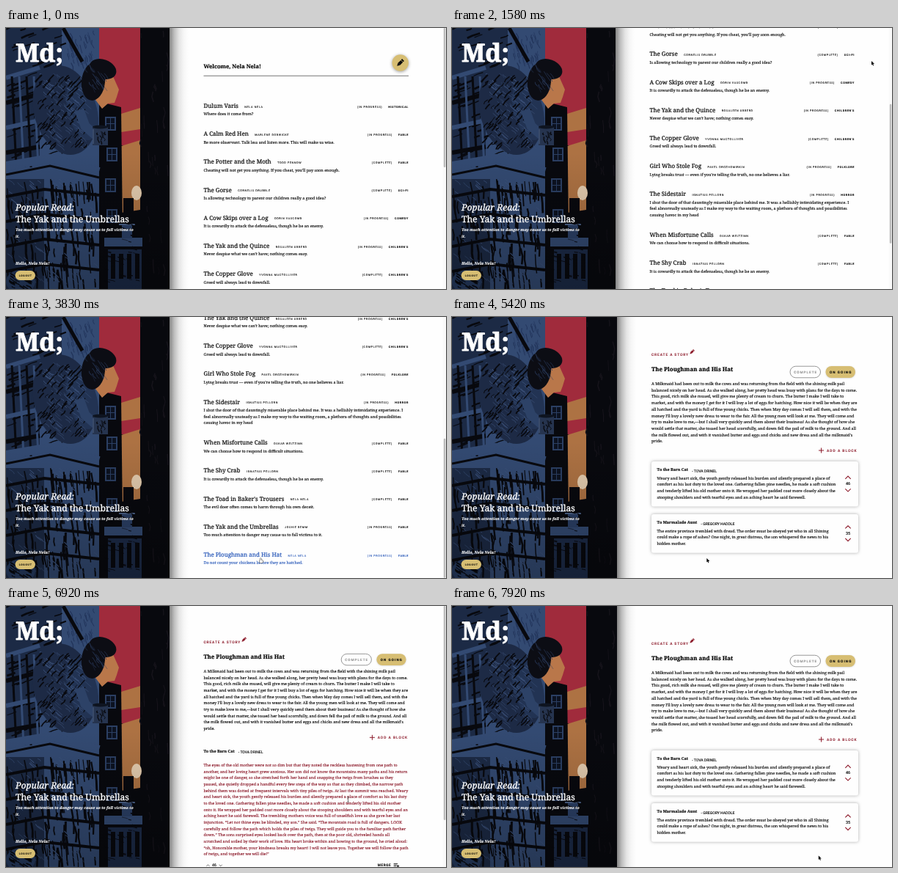
An HTML page with a canvas that plays this animation: 600 by 356 pixels, repeating every 8000 ms.

```html
<!DOCTYPE html>
<html lang="en">
<head>
<meta charset="utf-8">
<title>Story reader</title>
<style>
html, body { margin: 0; width: 100%; height: 100%; overflow: hidden; background: #fefefe; }
canvas { display: block; width: 600px; height: 356px; }
</style>
</head>
<body>
<canvas id="stage"></canvas>
<script>
const W = 600, H = 356, LOOP = 8000;
const SERIF = '"Noto Serif", serif', SANS = 'Roboto, sans-serif';
const INK = '#0c0c0c', RED = '#8c1a2a', GOLD = '#d7be73', BLUE = '#2858b8';
const LEFT = 269.5, RIGHT = 549, PITCH = 38.2, LEADING = 8.72, BODY = 5.43;
const MAX_SCROLL = 296;
const OPEN_STORY = 4300, EXPAND = 6130, COLLAPSE = 7640;

const canvas = document.getElementById('stage');
const dpr = window.devicePixelRatio || 1;
canvas.width = W * dpr;
canvas.height = H * dpr;
const c = canvas.getContext('2d');

const USER = 'Nela Nela';
const POPULAR = 'The Yak and the Umbrellas';
const STORY = 'The Ploughman and His Hat';
const DONE = '(COMPLETE)', OPEN = '(IN PROGRESS)';

// title, author, status, genre, description lines
const rows = [
  ['Dulum Varis', USER, OPEN, 'Historical', 'Where does it come from?'],
  ['A Calm Red Hen', 'Marlene Dobwicke', OPEN, 'Fable', 'Be more observant. Talk less and listen more. This will make us wise.'],
  ['The Potter and the Moth', 'Todd Fennow', DONE, 'Fable', "Cheating will not get you anything. If you cheat, you'll pay soon enough."],
  ['The Gorse', 'Cornelis Drubble', DONE, 'Sci-Fi', 'Is allowing technology to parent our children really a good idea?'],
  ['A Cow Skips over a Log', 'Odrin Vascomb', OPEN, 'Comedy', 'It is cowardly to attack the defenseless, though he be an enemy.'],
  ['The Yak and the Quince', 'Rosaleen Ubberd', OPEN, "Children's", "Never despise what we can't have; nothing comes easy."],
  ['The Copper Glove', 'Yvonna MacTolliver', DONE, "Children's", 'Greed will always lead to downfall.'],
  ['Girl Who Stole Fog', 'Pavel Drozhomirkin', OPEN, 'Folklore', "Lying breaks trust — even if you're telling the truth, no one believes a liar."],
  ['The Sidestair', 'Ignatius Pellorn', OPEN, 'Horror', 'I shut the door of that dauntingly miserable place behind me. It was a hellishly intimidating experience. I',
    'feel abnormally unsteady as I make my way to the waiting room, a plethora of thoughts and possibilities', 'causing havoc in my head'],
  ['When Misfortune Calls', 'Oskar Weltzinn', DONE, 'Fable', 'We can choose how to respond in difficult situations.'],
  ['The Shy Crab', 'Ignatius Pellorn', DONE, 'Fable', 'It is cowardly to attack the defenseless, though he be an enemy.'],
  ["The Toad in Baker's Trousers", USER, DONE, 'Fable', 'The evil doer often comes to harm through his own deceit.'],
  [POPULAR, 'Joshie Bemm', OPEN, 'Fable', 'Too much attention to danger may cause us to fall victims to it.'],
  [STORY, USER, OPEN, 'Fable', 'Do not count your chickens before they are hatched.']
];

const storyText = `A Milkmaid had been out to milk the cows and was returning from the field with the shining milk pail
balanced nicely on her head. As she walked along, her pretty head was busy with plans for the days to come.
This good, rich milk she mused, will give me plenty of cream to churn. The butter I make I will take to
market, and with the money I get for it I will buy a lot of eggs for hatching. How nice it will be when they are
all hatched and the yard is full of fine young chicks. Then when May day comes I will sell them, and with the
money I'll buy a lovely new dress to wear to the fair. All the young men will look at me. They will come and
try to make love to me,—but I shall very quickly send them about their business! As she thought of how she
would settle that matter, she tossed her head scornfully, and down fell the pail of milk to the ground. And all
the milk flowed out, and with it vanished butter and eggs and chicks and new dress and all the milkmaid's
pride.`.split('\n');

const blockOne = `Weary and heart sick, the youth gently released his burden and silently prepared a place of
comfort as his last duty to the loved one. Gathering fallen pine needles, he made a soft cushion
and tenderly lifted his old mother onto it. He wrapped her padded coat more closely about the
stooping shoulders and with tearful eyes and an aching heart he said farewell.`.split('\n');

const blockTwo = `The entire province trembled with dread. The order must be obeyed yet who in all Shining
could make a rope of ashes? One night, in great distress, the son whispered the news to his
hidden mother.`.split('\n');

const fullText = `The eyes of the old mother were not so dim but that they noted the reckless hastening from one path to
another, and her loving heart grew anxious. Her son did not know the mountains many paths and his return
might be one of danger, so she stretched forth her hand and snapping the twigs from brushes as they
passed, she quietly dropped a handful every few steps of the way so that as they climbed, the narrow path
behind them was dotted at frequent intervals with tiny piles of twigs. At last the summit was reached. Weary
and heart sick, the youth gently released his burden and silently prepared a place of comfort as his last duty
to the loved one. Gathering fallen pine needles, he made a soft cushion and tenderly lifted his old mother
onto it. He wrapped her padded coat more closely about the stooping shoulders and with tearful eyes and an
aching heart he said farewell. The trembling mothers voice was full of unselfish love as she gave her last
injunction. “Let not thine eyes be blinded, my son.” She said. “The mountain road is full of dangers. LOOK
carefully and follow the path which holds the piles of twigs. They will guide you to the familiar path farther
down.” The sons surprised eyes looked back over the path, then at the poor old, shriveled hands all
scratched and soiled by their work of love. His heart broke within and bowing to the ground, he cried aloud:
“oh, Honorable mother, your kindness breaks my heart! I will not leave you. Together we will follow the path
of twigs, and together we will die!”`.split('\n');

// Set large and scaled down, so that small sizes keep exact advances;
// the thin outline gives small type its weight.
function text(str, x, y, size, color = INK, { style = '', font = SERIF, gap = 0, align = 0 } = {}) {
  const k = size / 64;
  c.save();
  c.font = `${style} 64px ${font}`;
  c.letterSpacing = gap / k + 'px';
  c.textRendering = 'geometricPrecision';
  const width = c.measureText(str).width * k;
  c.translate(x - width * align, y);
  c.scale(k, k);
  c.fillStyle = c.strokeStyle = color;
  c.lineWidth = 1.7;
  c.lineJoin = 'round';
  c.fillText(str, 0, 0);
  c.strokeText(str, 0, 0);
  c.restore();
  return width;
}

function caps(str, x, y, size, color, gap, align = 0, style = '') {
  return text(str.toUpperCase(), x, y, size, color, { font: SANS, gap, align, style });
}

function paragraph(lines, x, y, color) {
  lines.forEach((str, i) => text(str, x, y + i * LEADING, BODY, color));
}

function rect(x, y, w, h, color) {
  c.fillStyle = color;
  c.fillRect(x, y, w, h);
}

function trace(points) {
  c.beginPath();
  for (let i = 0; i < points.length; i += 2) c.lineTo(points[i], points[i + 1]);
}

function poly(color, ...points) {
  trace(points);
  c.fillStyle = color;
  c.fill();
}

function line(color, width, ...points) {
  trace(points);
  c.strokeStyle = color;
  c.lineWidth = width;
  c.stroke();
}

function oval(x, y, rx, ry, turn, color) {
  c.beginPath();
  c.ellipse(x, y, rx, ry, turn, 0, Math.PI * 2);
  c.fillStyle = color;
  c.fill();
}

function pill(x, y, w, h, r, fill, stroke) {
  c.beginPath();
  c.roundRect(x, y, w, h, r);
  if (fill) { c.fillStyle = fill; c.fill(); }
  if (stroke) { c.strokeStyle = stroke; c.lineWidth = 0.9; c.stroke(); }
}

function raised(alpha, blur, dy, draw) {
  c.save();
  c.shadowColor = `rgba(0,0,0,${alpha})`;
  c.shadowBlur = blur * dpr;
  c.shadowOffsetY = dy * dpr;
  draw();
  c.restore();
}

function fade(x0, y0, x1, y1, ...alphas) {
  const g = c.createLinearGradient(x0, y0, x1, y1);
  alphas.forEach((a, i) => g.addColorStop(i / (alphas.length - 1), `rgba(0,0,0,${a})`));
  return g;
}

function chevron(x, y, r, dir, color) {
  const d = dir * r / 2;
  line(color, r * 0.3, x - r, y - d, x, y + d, x + r, y - d);
}

function plus(x, y, r, color) {
  line(color, 1, x - r, y, x + r, y);
  line(color, 1, x, y - r, x, y + r);
}

function pencil(x, y, r, color) {
  c.save();
  c.translate(x, y);
  c.rotate(Math.PI * 0.75);
  const h = r * 0.36;
  rect(-r, -h, r * 0.35, h * 2, color);
  rect(-r * 0.55, -h, r, h * 2, color);
  poly(color, r * 0.45, -h, r * 1.1, 0, r * 0.45, h);
  c.restore();
}

function scrollbar(pos, size) {
  rect(595.6, 0, 4.4, H, '#fafafa');
  pill(596.8, pos, 2.6, size, 1.3, '#bdbdbd');
}

// Motion
const smooth = u => u * u * (3 - 2 * u);
const progress = (t, from, to) => Math.min(1, Math.max(0, (t - from) / (to - from)));
const listScroll = t => MAX_SCROLL * progress(t, 920, 1976);
const textScroll = t => 30 * smooth(progress(t, 6960, 7400));

// start, end, x, y of each glide, beginning at the first point
const glides = [
  [80, 80, 559, 312], [80, 800, 572, 45], [1950, 2170, 571, 53], [2600, 3260, 347.3, 329],
  [5450, 5850, 466, 250], [6300, 6700, 466.5, 264], [6980, 7450, 499.8, 340.5]
];
function pointer(t) {
  let x = 0, y = 0;
  for (const [from, to, px, py] of glides) {
    const u = from === to ? 1 : smooth(progress(t, from, to));
    x += (px - x) * u;
    y += (py - y) * u;
  }
  return [x, y];
}

// Side panel illustration
function illustration() {
  const night = '#08090e', blue = '#334a72', dim = '#1c2a45', red = '#a02b3c', tan = '#ad7243';
  let seed = 11;
  const rnd = () => (seed = seed * 16807 % 2147483647) / 2147483647;
  // loose brush strokes inside a box
  const brush = (n, x, y, w, h, dx, dy, color, width) => {
    for (let i = 0; i < n; i++) {
      const px = x + rnd() * w, py = y + rnd() * h, s = 0.4 + rnd() * 0.8, bend = (rnd() - 0.5) * 4;
      line(color, width * (0.5 + rnd()), px, py, px + dx * s / 2 + bend, py + dy * s / 2, px + dx * s, py + dy * s);
    }
  };

  // sky and towers
  rect(0, 0, 226, H, night);
  rect(127, 0, 56, 160, red);
  for (const [y, h] of [[112, 30], [156, 96]]) poly(tan, 157, y + 5, 183, y - 3, 183, y + h - 4, 157, y + h);
  oval(178, 225, 7, 10, 0, '#e3cbae');
  rect(160, 232, 14, 30, night);
  poly(night, 125, 100, 157, 108, 160, H, 125, H);
  brush(30, 184, 0, 38, 340, 1, 16, '#15131a', 1.2);
  for (let i = 0; i < 4; i++) {
    const x = 135 + i % 2 * 2, y = 121 + i * 42;
    rect(x, y, 15, 19, '#2b3f63');
    for (let j = 0; j < 4; j++) rect(x + 2 + j % 2 * 6, y + 2 + (j >> 1) * 8, 5, 7, '#0c1220');
  }

  // wall, broken by window openings
  rect(0, 0, 127, H, blue);
  rect(0, 0, 76, 62, dim);
  rect(0, 62, 46, 122, dim);
  brush(70, 0, 0, 78, 190, 16, -6, night, 2);
  brush(40, 82, 2, 38, 46, 3, 12, '#22345a', 0.9);
  line(night, 5, 78, 0, 104, 46);
  for (let i = 0; i < 4; i++) {
    line(i % 2 ? night : blue, 6, 0, 68 + i * 34, 46, 54 + i * 36);
    line(i % 2 ? blue : night, 3, 8 + i * 10, 66, 14 + i * 10, 190);
  }

  // leaning figure
  oval(80, 112, 42, 62, -0.25, '#1d2a45');
  oval(104, 112, 20, 42, -0.25, '#223353');
  brush(110, 48, 62, 60, 98, 9, 8, '#3a4f76', 0.8);
  brush(90, 46, 62, 64, 98, -8, 9, night, 1.3);
  line('#2d4267', 13, 100, 112, 108, 134, 122, 146);
  poly('#b9774a', 130, 72, 146, 66, 154, 84, 151, 94, 148, 102, 139, 103, 131, 110, 122, 98);
  oval(119, 73, 16, 26, 0.1, '#0c0d14');
  oval(132, 56, 19, 13, 0.35, '#0c0d14');
  brush(20, 108, 48, 26, 32, 8, 12, '#2b3d60', 0.6);
  rect(118, 135, 21, 25, '#26344f');
  oval(128.5, 135, 10.5, 2.5, 0, '#0e1420');
  line('#5a7095', 0.8, 119, 138, 119, 158);
  brush(10, 121, 140, 14, 14, 2, 8, night, 1);

  // sill, lower wall and railings
  line(blue, 12, 0, 188, 60, 178, 127, 196);
  line(night, 3, 0, 200, 60, 188, 127, 204);
  rect(0, 206, 52, 150, dim);
  brush(130, 0, 206, 122, 140, 2, 26, night, 2);
  brush(70, 0, 206, 122, 140, 9, 8, '#3a5079', 0.8);
  for (let y = 220; y < H; y += 34) line(night, 4, 0, y + 10, 52, y, 127, y + 8);
  oval(20, 346, 20, 16, 0, '#263b60');
  brush(30, 3, 333, 32, 20, 8, 5, night, 1.2);

  // rooftops
  rect(134, 286, 52, 12, blue);
  rect(158, 268, 14, 19, '#2b4066');
  line('#4a6086', 2, 154, 268, 176, 268);
  rect(139, 302, 46, 54, '#1c2b48');
  for (let x = 143; x < 182; x += 11) rect(x, 308, 6, 34, night);
  brush(40, 134, 264, 48, 84, 8, 2, night, 1);
  rect(0, 170, 226, 186, fade(0, 170, 0, H, 0, 0.25));
}

function sidebar(width) {
  rect(width, 0, 26, H, fade(width, 0, width + 26, 0, 0.48, 0.25, 0.1, 0.03, 0));
  c.save();
  c.beginPath();
  c.rect(0, 0, width, H);
  c.clip();
  illustration();
  c.restore();
  const white = '#fff', note = { style: 'italic 600' };
  text('Md;', 13, 46, 34, white, { style: 'bold' });
  text('Popular Read:', 13, 249, 12.1, white, { style: 'italic' });
  text(POPULAR, 13, 265.3, 12.1, white);
  text('Too much attention to danger may cause us to fall victims to', 13, 277, 5.2, white, note);
  text('it.', 13, 285.6, 5.2, white, note);
  text(`Hello, ${USER}!`, 13, 323, 5.4, white, note);
  pill(12.5, 331, 27.5, 13, 6.5, GOLD);
  caps('Logout', 26.6, 338.8, 3.4, INK, 0.8, 0.5, 'bold');
}

// Story list
const rowTop = i => 106 + i * PITCH + (i > 8 ? 2 * LEADING : 0);

function listRow([title, author, status, genre, ...about], y, color) {
  const width = text(title, LEFT, y + 3, 7.97, color);
  caps(author, LEFT + width + 8.5, y + 2.6, 3.73, color, 0.65);
  const genreWidth = caps(genre, RIGHT, y + 2.6, 3.73, color, 0.65, 1, 'bold');
  caps(status, RIGHT - genreWidth - 8, y + 2.6, 3.73, color, 0.65, 1);
  paragraph(about, LEFT, y + 13.4, color);
}

function listPage(t, [mx, my]) {
  const scroll = listScroll(t);
  const inList = scroll === MAX_SCROLL && mx > LEFT && mx < RIGHT;
  const hot = inList ? rows.findIndex((_, i) => my + scroll < rowTop(i + 1) - 8) : -1;
  c.save();
  c.translate(0, -scroll);
  text(`Welcome, ${USER}!`, LEFT, 55, 7.5, INK, { style: 'bold' });
  rect(LEFT, 64.8, RIGHT - LEFT, 0.8, '#555');
  raised(0.4, 4, 1, () => pill(526.5, 36.3, 22.4, 22.4, 11.2, GOLD));
  pencil(537.6, 47.5, 5.6, INK);
  rows.forEach((row, i) => listRow(row, rowTop(i), i === hot ? BLUE : INK));
  c.restore();
  scrollbar(scroll * 0.56, 190);
  sidebar(223);
  return hot < 0 ? 'arrow' : 'hand';
}

// Story pages, drawn relative to the left edge of the text
function storyHead() {
  caps('Create a story', 0, 53, 4.9, RED, 0.88, 0, '500');
  pencil(55.3, 47.6, 3.8, RED);
  text(STORY, 0, 74, 7.9, INK, { style: 'bold' });
  pill(189, 67.2, 41.5, 15.6, 7.8, null, '#8c8c8c');
  caps('Complete', 210.2, 76.7, 4.6, '#8c8c8c', 1.05, 0.5, '500');
  raised(0.18, 2, 0.5, () => pill(237.5, 67, 40.5, 16, 8, GOLD));
  caps('On going', 258.2, 76.7, 4.6, INK, 1.1, 0.5, 'bold');
  paragraph(storyText, 0, 93);
  plus(231.5, 182, 3.5, RED);
  caps('Add a block', 239, 184, 4.9, RED, 1, 0, '500');
}

function blockTitle(x, y, title, author) {
  const width = text(title, x, y, 5.45, INK, { style: 'bold' });
  caps('- ' + author, x + width + 5.2, y + 1.4, 5.1, INK, 0);
}

function block(y, title, author, lines, votes) {
  const h = 26.5 + lines.length * LEADING, mid = y + h / 2 - 0.5;
  raised(0.32, 4, 0, () => pill(0, y, 282, h, 3, '#fefefe'));
  blockTitle(7.5, y + 13.3, title, author);
  paragraph(lines, 7.5, y + 24.5);
  for (const dir of [-1, 1]) chevron(268, mid + 0.4 + dir * 8.6, 3.7, dir, RED);
  caps(votes, 268, mid + 2, 5.5, INK, 0, 0.5);
}

const firstTitle = ['To the Barn Cat', 'Tova Drinel'];
const secondBlock = y => block(y, 'To Marmalade Aunt', 'Gregory Haddle', blockTwo, '35');

function storyPage() {
  c.save();
  c.translate(272, 0);
  storyHead();
  block(197, ...firstTitle, blockOne, '46');
  secondBlock(269);
  c.restore();
  sidebar(225);
}

function expandedPage(t) {
  const scroll = textScroll(t);
  c.save();
  c.translate(LEFT, -1.4 - scroll);
  c.scale(0.993, 0.993);
  storyHead();
  blockTitle(0, 202.8, ...firstTitle);
  paragraph(fullText, 0, 222, RED);
  for (const dir of [-1, 1]) chevron(14.7 + dir * 8.7, 357.7, 2, dir, INK);
  caps('46', 14.5, 359.3, 5.3, INK, 0, 0.5);
  caps('Merge', 239, 358.9, 4.7, INK, 0.6, 0, 'bold');
  for (let i = 0; i < 3; i++) rect(261, 354.8 + i * 1.8, 5.5 - i, 0.8, INK);
  plus(266.8, 358.8, 1.8, INK);
  secondBlock(371);
  c.restore();
  scrollbar(scroll * 0.82, 292);
  sidebar(223);
}

function cursor(kind, x, y) {
  c.save();
  c.translate(x, y);
  if (kind === 'text') {
    line('#444', 0.7, 0, -3, 0, 3);
    for (const end of [-3.2, 3.2]) line('#444', 0.7, -1.4, end, 1.4, end);
  } else if (kind === 'hand') {
    c.beginPath();
    c.roundRect(-0.7, 0, 1.5, 4.5, 0.7);
    c.roundRect(-1.8, 2.6, 4.8, 3.8, 1.3);
    c.strokeStyle = '#222';
    c.lineWidth = 1;
    c.stroke();
    c.fillStyle = '#fff';
    c.fill();
  } else {
    const shape = [0, 0, 0, 5.6, 1.3, 4.4, 2.2, 6.4, 3.1, 6, 2.2, 4.1, 4, 4.1];
    line('#fff', 1.1, ...shape, 0, 0);
    poly('#000', ...shape);
  }
  c.restore();
}

function draw(t) {
  c.setTransform(dpr, 0, 0, dpr, 0, 0);
  rect(0, 0, W, H, '#fefefe');
  const mouse = pointer(t);
  let kind = 'arrow';
  if (t < OPEN_STORY) {
    kind = listPage(t, mouse);
  } else if (t >= EXPAND && t < COLLAPSE) {
    expandedPage(t);
    if (t < 7380) kind = 'text';
  } else {
    storyPage();
    if (mouse[1] < 321) kind = 'hand';
  }
  if (t >= 80) cursor(kind, ...mouse);
}

const start = performance.now();
function loop(now) {
  draw(Math.max(0, now - start) % LOOP);
  requestAnimationFrame(loop);
}
requestAnimationFrame(loop);
</script>
</body>
</html>
```
